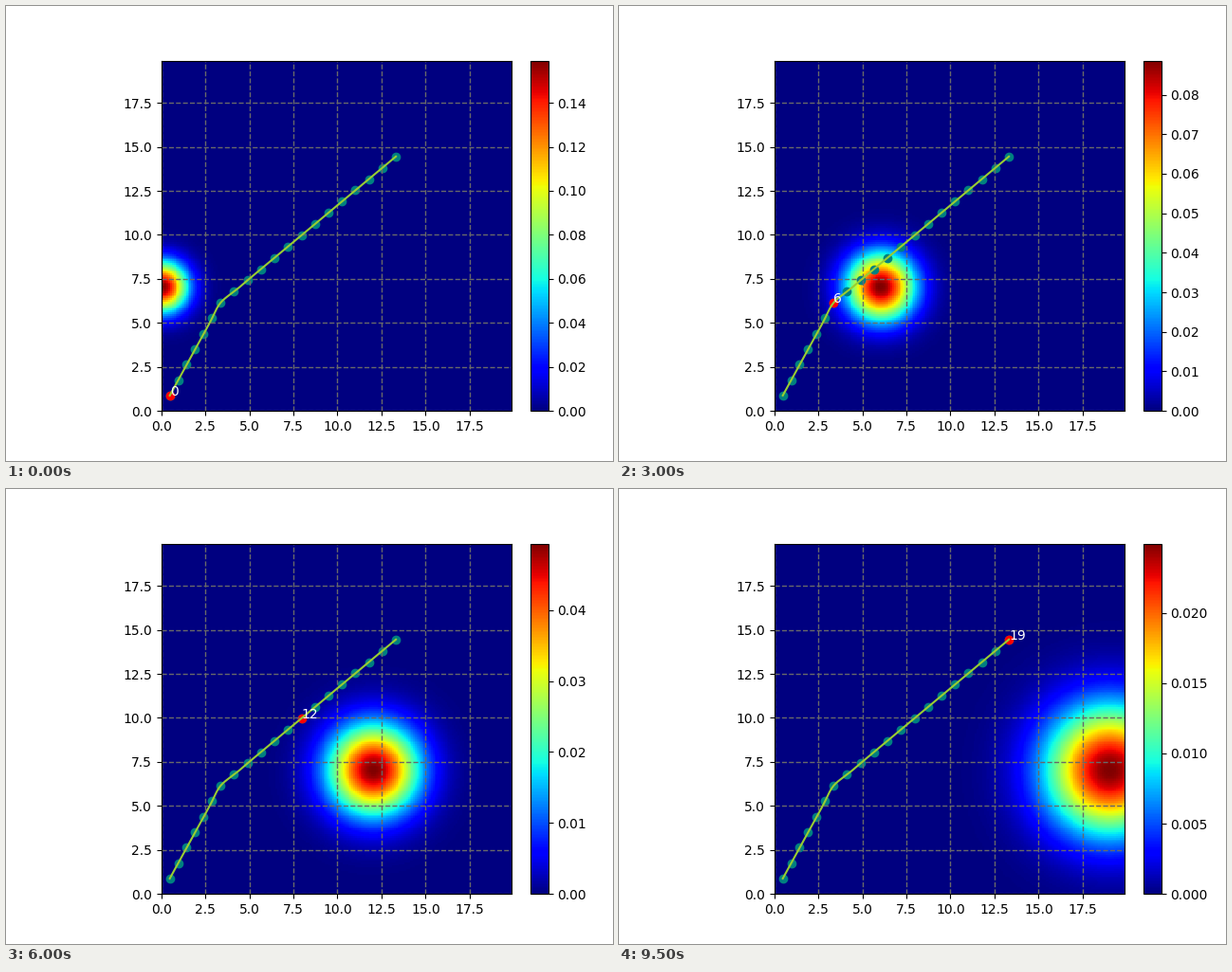
Recreate the animation shown at these times as a matplotlib script. Size 640 by 480 pixels, loop 10000 ms.

```python
import numpy as np
import matplotlib.pyplot as plt
from matplotlib.animation import FuncAnimation

STEPS = 20
TURN = 6                              # index of the bend in the path
CLIMB = np.array([0.48, 0.877])       # step before the bend
CRUISE = np.array([0.766, 0.6395])    # step after the bend


def waypoints():
    k = np.arange(STEPS)[:, None]
    return (np.minimum(k, TURN) + 1) * CLIMB + np.maximum(k - TURN, 0) * CRUISE


def cubic_spline(points, samples=300):
    """Natural cubic spline through evenly parametrised points."""
    n = len(points)
    system = 4 * np.eye(n) + np.eye(n, k=1) + np.eye(n, k=-1)
    system[0, 0] = system[-1, -1] = 2
    rhs = np.empty_like(points)
    rhs[1:-1] = 3 * (points[2:] - points[:-2])
    rhs[0] = 3 * (points[1] - points[0])
    rhs[-1] = 3 * (points[-1] - points[-2])
    slope = np.linalg.solve(system, rhs)

    t = np.linspace(0, n - 1, samples)
    i = np.minimum(t.astype(int), n - 2)
    u = (t - i)[:, None]
    return ((1 + 2 * u) * (1 - u) ** 2 * points[i]
            + u * (1 - u) ** 2 * slope[i]
            + u ** 2 * (3 - 2 * u) * points[i + 1]
            + u ** 2 * (u - 1) * slope[i + 1])


def density(step):
    """Gaussian that drifts right and spreads by 5 % per step."""
    var = 1.05 ** (2 * step)
    dist2 = (X - step) ** 2 + (Y - 7) ** 2
    return np.exp(-dist2 / (2 * var)) / (2 * np.pi * var)


axis = np.arange(200) / 10
X, Y = np.meshgrid(axis, axis)
path = waypoints()
curve = cubic_spline(path)

fig = plt.figure(figsize=(6.4, 4.8), dpi=100)


def draw(step):
    fig.clear()
    ax = fig.add_subplot()
    mesh = ax.pcolormesh(X, Y, density(step)[:-1, :-1], cmap="jet")
    ax.set_aspect("equal")
    ax.set_xlim(0, axis[-1])
    ax.set_ylim(0, axis[-1])
    fig.colorbar(mesh, ax=ax, fraction=0.046, pad=0.04)

    ax.grid(color="dimgray", linestyle="--", linewidth=1)
    ax.scatter(*path.T, color="teal")
    ax.scatter(*path[step], color="red")
    ax.plot(*curve.T, color="yellowgreen")
    ax.text(*path[step], str(step), color="white")


anim = FuncAnimation(fig, draw, frames=STEPS, init_func=lambda: None,
                     interval=500, repeat=True, repeat_delay=0)
plt.show()
```
